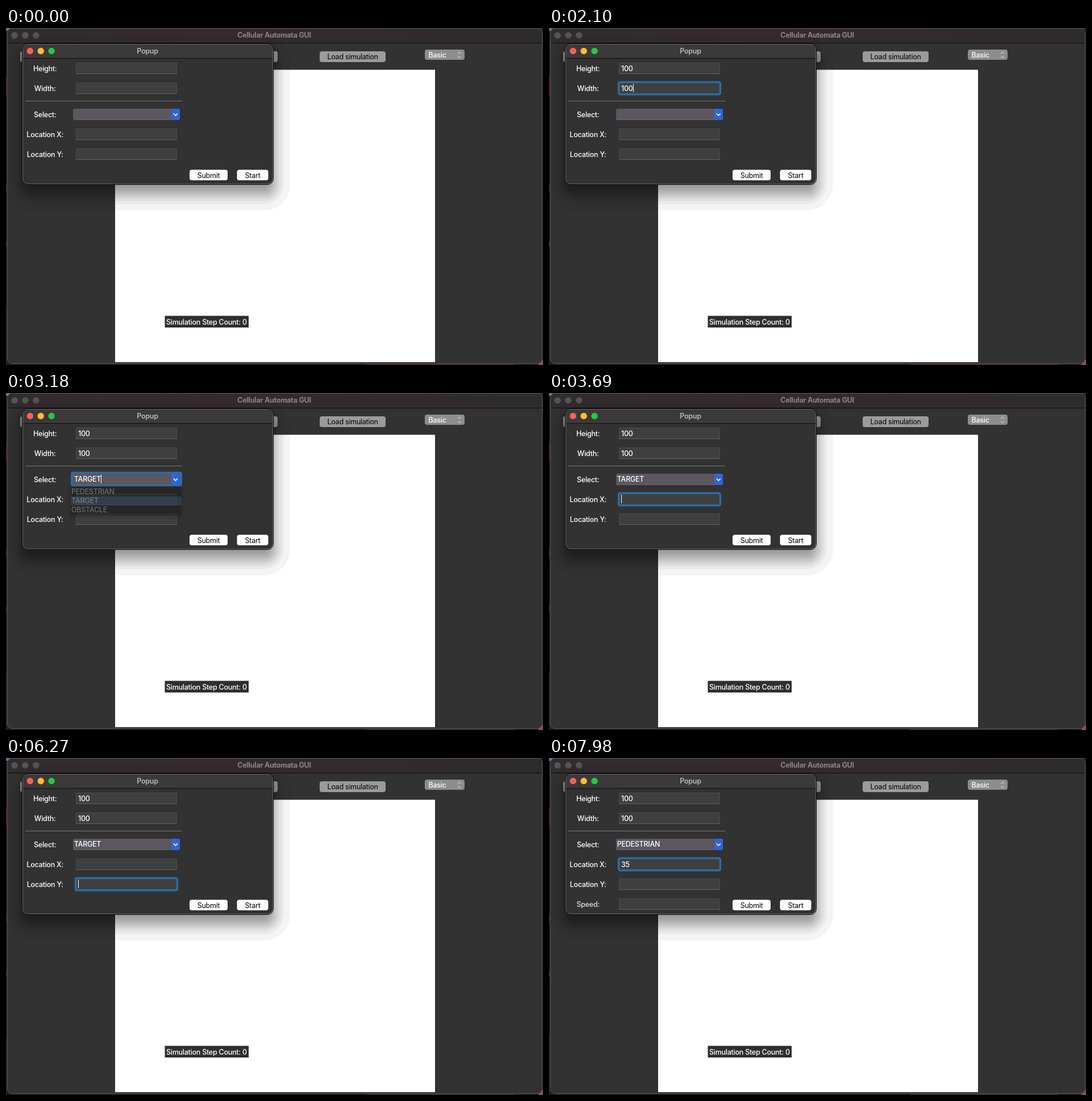
An HTML page with a canvas for the animation above (8000 ms loop, 945x593 px).

```html
<!DOCTYPE html>
<html lang="en">
<head>
<meta charset="utf-8">
<title>Cellular Automata GUI</title>
<style>
  html, body { margin: 0; width: 100%; height: 100%; overflow: hidden; background: #1c1a1e; }
  canvas { display: block; }
</style>
</head>
<body>
<canvas id="stage" width="945" height="593"></canvas>
<script>
const g = document.getElementById('stage').getContext('2d');
const LOOP = 8000;
const OPTIONS = ['PEDESTRIAN', 'TARGET', 'OBSTACLE'];
const TOPS = { height: 61, width: 96, x: 177, y: 212, speed: 247 };

// Each track lists [start time, value]; the latest started value holds.
const TRACKS = {
  height: [[0, ''], [840, '1'], [900, '10'], [990, '100']],
  width: [[0, ''], [1410, '1'], [1560, '10'], [1740, '100']],
  x: [[0, ''], [4200, '5'], [4290, '50'], [6090, ''], [7800, '3'], [7920, '35']],
  y: [[0, ''], [5190, '5'], [5400, '50'], [6090, '']],
  select: [[0, ''], [3090, 'TARGET'], [6930, 'PEDESTRIAN']],
  focus: [[0, ''], [270, 'height'], [1290, 'width'], [2460, ''], [3090, 'select'], [3690, 'x'],
    [4680, 'y'], [6420, ''], [6930, 'select'], [7350, 'x']],
  caret: [[0, true], [840, false], [1110, true], [1410, false], [2100, true], [4200, false],
    [4470, true], [5190, false], [5490, true], [7800, false]],
  hover: [[0, 0], [3030, 1], [6870, 0]],
  pressed: [[0, false], [5910, true], [6030, false]]
};

function at(name, t) {
  return TRACKS[name].filter(([start]) => start <= t).pop()[1];
}

function rect(x, y, w, h, color) {
  g.fillStyle = color;
  g.fillRect(x, y, w, h);
}

function box(x, y, w, h, r, fill, stroke, lineWidth = 1) {
  g.beginPath();
  g.roundRect(x, y, w, h, r);
  if (fill) { g.fillStyle = fill; g.fill(); }
  if (stroke) { g.strokeStyle = stroke; g.lineWidth = lineWidth; g.stroke(); }
}

function text(s, x, y, color = '#fff', weight = 500, align = 'left') {
  g.font = `${weight} 12.5px Inter, sans-serif`;
  g.letterSpacing = '-0.25px';
  g.textAlign = align;
  g.fillStyle = color;
  g.fillText(s, x, y);
}

function lights(x, y, r, colors) {
  colors.forEach((color, i) => {
    g.beginPath();
    g.arc(x + i * 18.9, y, r, 0, 7);
    g.fillStyle = color;
    g.fill();
  });
}

function line(points, color, width) {
  g.beginPath();
  points.forEach(([x, y]) => g.lineTo(x, y));
  g.strokeStyle = color;
  g.lineWidth = width;
  g.stroke();
}

function button(label, x, y, w, h, fill) {
  box(x, y, w, h, 4, fill);
  text(label, x + w / 2, y + 14, '#000', 400, 'center');
}

function drawMainWindow() {
  rect(0, 0, 945, 593, '#1c1a1e');
  rect(0, 0, 945, 1, '#4c4450');
  rect(0, 0, 6, 5, '#5f7890');
  rect(937, 584, 8, 9, '#8a5068');
  rect(0, 86, 1, 34, '#a3222c');
  rect(0, 275, 1, 14, '#8f2a30');
  rect(0, 376, 1, 9, '#a53538');
  rect(0, 490, 1, 103, '#4a2562');
  rect(635, 592, 260, 1, '#6a3550');
  box(2.5, 0.5, 941, 590, 8, '#323232', '#5e5c5f');
  const bar = g.createLinearGradient(0, 0, 945, 0);
  bar.addColorStop(0, '#302c30');
  bar.addColorStop(0.4, '#352a30');
  bar.addColorStop(1, '#2e2b2e');
  box(3, 1, 940, 25, [8, 8, 0, 0], bar);
  rect(3, 26, 940, 1, '#0c0c0c');
  lights(15, 13, 5.8, ['#565256', '#565256', '#565256']);
  text('Cellular Automata GUI', 472, 17, '#8b868a', 700, 'center');

  box(25, 41, 453, 19, 4, '#9b9b9b');
  button('Load simulation', 552, 41, 116, 19, '#9b9b9b');
  box(737, 38, 70, 18, 4, '#8d8d8d');
  text('Basic', 743.5, 52);
  line([[795, 45], [798, 42], [801, 45]], '#c4c4c4', 1.2);
  line([[795, 49.5], [798, 52.5], [801, 49.5]], '#c4c4c4', 1.2);

  rect(192, 73.5, 563, 514.5, '#fff');
  rect(279.5, 506.5, 147.5, 20.5, '#2e302f');
  text('Simulation Step Count: 0', 282, 522);
}

// Stacked translucent outlines give the shadow its visible bands.
function drawPopupShadow() {
  const bands = 14;
  for (let i = 0; i < bands; i++) {
    const p = (i + 0.5) / bands;
    const spread = Math.round(9 * Math.log(1 / p - 1));
    box(29 - spread, 44 - spread, 441 + 2 * spread, 247 + 2 * spread,
      Math.max(8, 16 + spread), 'rgba(0,0,0,.042)');
  }
}

function drawPopupFrame() {
  drawPopupShadow();
  box(28.5, 27.5, 442, 248, 10, null, '#000');
  box(29.5, 28.5, 440, 246, 9, '#323232', '#6b6b6b');
  box(30, 29, 439, 24, [8, 8, 0, 0], '#3b393a');
  rect(30, 53, 439, 1, '#0f0f0f');
  lights(42.3, 40.5, 5.7, ['#fe5f57', '#febc2e', '#28c840']);
  text('Popup', 249, 45, '#b9b7b8', 600, 'center');
  rect(34, 128, 276, 1, '#737a72');
}

function caretAfter(s, x, top) {
  rect(Math.round(x + g.measureText(s).width), top, 1, 15, '#fff');
}

function drawField(name, label, t) {
  const top = TOPS[name];
  const value = TRACKS[name] ? at(name, t) : '';
  const focused = at('focus', t) === name;
  text(label, 68.7, top + 15, name === 'speed' ? '#dcdcdc' : '#fff', 500, 'center');
  rect(123, top, 178, 20, '#3f3f3f');
  box(123.5, top + 0.5, 177, 19, 0, null, '#4b4b4b');
  rect(123, top + 19, 178, 1, '#626262');
  if (focused) box(122.6, top - 0.8, 178.8, 21.6, 2.5, null, '#2b6da3', 3.5);
  text(value, 127, top + 14.5);
  if (focused && at('caret', t)) caretAfter(value, 127, top + 2);
}

function drawCombo(t) {
  const value = at('select', t);
  const focused = at('focus', t) === 'select';
  text('Select:', 68.7, 157, '#fff', 500, 'center');
  if (focused) box(114, 138.5, 196, 26, 4, '#2b6da3');
  box(118, 142, 188, 20, 3, '#5b5660');
  rect(119, 161, 172, 1, '#6b6670');
  box(291, 142, 15, 20, [0, 3, 3, 0], '#3264d6');
  line([[294.8, 150.5], [298.3, 154], [301.8, 150.5]], '#fff', 1.6);
  text(value, 119.7, 156);
  if (focused) caretAfter(value, 119.7, 144);
}

function drawMenu(t, opened, chosen) {
  const fade = Math.min(1, 1 - (t - chosen) / 135);
  if (t < opened || fade <= 0) return;
  g.save();
  g.globalAlpha = fade;
  g.save();
  g.shadowColor = 'rgba(0,0,0,.5)';
  g.shadowBlur = 7;
  g.shadowOffsetY = 2;
  rect(113, 164, 197, 52, '#1d1d1d');
  g.restore();
  box(113.5, 164.5, 196, 51, 0, null, '#3b3b3b');
  rect(114, 166 + at('hover', t) * 16, 195, 16, '#3f638b');
  OPTIONS.forEach((option, i) => text(option, 115, 178 + i * 16));
  g.restore();
}

function draw(t) {
  drawMainWindow();
  drawPopupFrame();
  drawField('height', 'Height:', t);
  drawField('width', 'Width:', t);
  drawCombo(t);
  drawField('x', 'Location X:', t);
  drawField('y', 'Location Y:', t);
  if (t >= 6930) drawField('speed', 'Speed:', t);
  button('Submit', 323, 249.5, 67, 18.5, at('pressed', t) ? '#c8c8c8' : '#fff');
  button('Start', 406.5, 249.5, 55, 18.5, '#fff');
  drawMenu(t, 2490, 3090);
  drawMenu(t, 6420, 6930);
}

const begin = performance.now();
function tick() {
  draw((performance.now() - begin) % LOOP);
  requestAnimationFrame(tick);
}
tick();
</script>
</body>
</html>
```
